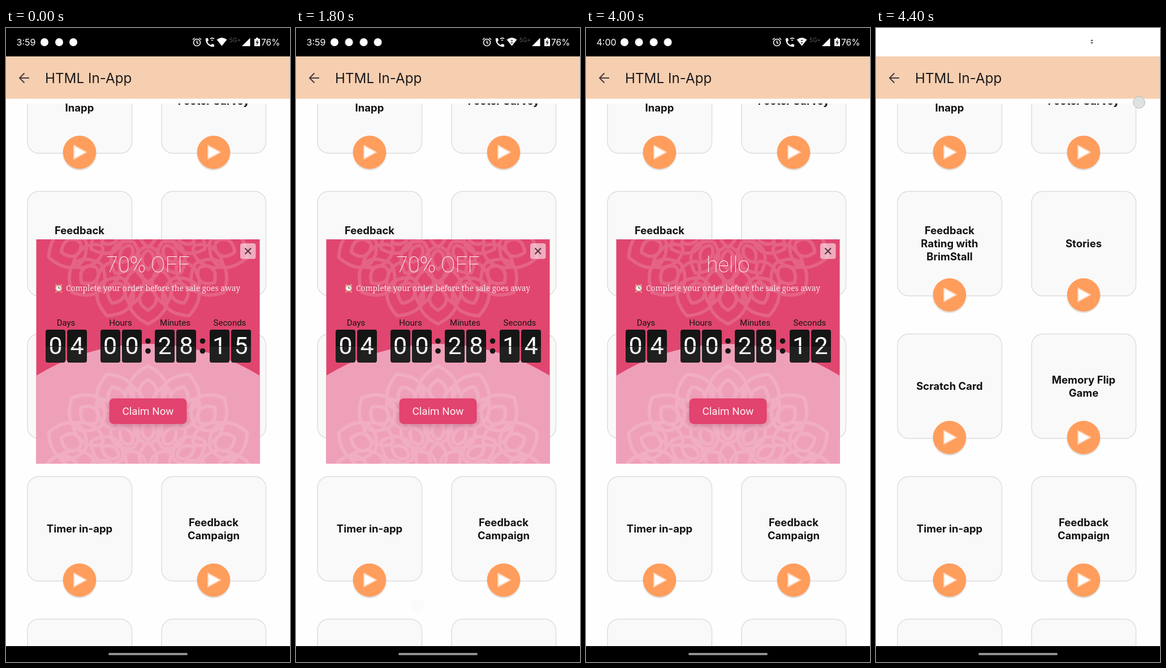
These frames come from a looping animation (502x1116 px, 4.5 s). An HTML page:

```html
<!DOCTYPE html>
<html lang="en">
<head>
<meta charset="utf-8">
<title>HTML In-App countdown</title>
<style>
  html, body { margin: 0; width: 100%; height: 100%; overflow: hidden; background: #fff; }
  #stage { position: relative; width: 502px; height: 1116px; overflow: hidden; background: #fefefe; }
  svg, #popup { position: absolute; left: 0; top: 0; width: 502px; height: 1116px; }
  svg text { font-family: Inter, sans-serif; }
  .mid { text-anchor: middle; }
  .label { font-size: 18.5px; font-weight: 700; fill: #111; text-anchor: middle; }
  svg .thin { font: 100 38px Roboto, sans-serif; fill: #fff; text-anchor: middle; }
  svg .unit { font: 15px Roboto, sans-serif; fill: #151515; text-anchor: middle; }

  .tile { position: absolute; top: 531px; width: 35px; height: 58px; perspective: 244px;
          font: 43px/57px Roboto, sans-serif; text-align: center; }
  .half { position: absolute; left: 0; width: 35px; height: 29px; overflow: hidden;
          box-sizing: border-box; backface-visibility: hidden; }
  .upper { top: 0; background: #151515; color: #fff; border-radius: 4px 4px 0 0; }
  .lower { top: 29px; background: #202020; color: #efefef; border-top: 1px solid #151515;
           border-radius: 0 0 4px 4px; }
  .lower span { position: relative; top: -30px; }
  .half span { display: block; }
  .leaf { position: absolute; inset: 0; transform-style: preserve-3d;
          animation: flip 1s 1290ms 3 both; }
  .leaf .lower { transform-origin: 50% 0; transform: rotateX(180deg); }

  .loop { animation: 4500ms linear infinite; }
  .fade { animation-name: fade; }
  .offer { animation-name: offer; }
  .hello { animation-name: hello; }
  .early { animation-name: early; }
  .late { animation-name: late; }
  .arrows { animation-name: arrows; }
  .shift { animation-name: shift; }
  .arrive { animation-name: arrive; }
  .pointer { animation-name: pointer; }
  .offer, .hello, .early, .late, .arrows, .pointer { animation-timing-function: step-end; }

  @keyframes flip {
    0% { transform: rotateX(0); animation-timing-function: ease-in-out; }
    50%, 100% { transform: rotateX(-180deg); }
  }
  @keyframes fade { 0%, 88.889% { opacity: 1; } 97.777%, 100% { opacity: 0; } }
  @keyframes offer { 0% { opacity: 1; } 86.66%, 100% { opacity: 0; } }
  @keyframes hello { 0% { opacity: 0; } 86.66%, 100% { opacity: 1; } }
  @keyframes early { 0% { opacity: 1; } 48.88%, 100% { opacity: 0; } }
  @keyframes late { 0% { opacity: 0; } 48.88%, 100% { opacity: 1; } }
  @keyframes arrows { 0% { opacity: 0; } 28.88%, 100% { opacity: 1; } }
  @keyframes shift {
    0%, 1% { transform: none; animation-timing-function: ease-out; }
    12%, 100% { transform: translateX(25.6px); }
  }
  @keyframes arrive { 0%, 4% { opacity: 0; } 12%, 100% { opacity: 1; } }
  @keyframes pointer {
    0% { opacity: 0; transform: translate(215px, 1016px); }
    37.77% { opacity: .1; transform: translate(215px, 1016px); }
    48.88% { opacity: 0; transform: translate(442px, 398px); }
    84.44% { opacity: .8; transform: translate(442px, 398px); }
    88.88% { opacity: 0; transform: translate(465px, 131px); }
    97.77%, 100% { opacity: 1; transform: translate(465px, 131px); }
  }
</style>
</head>
<body>
<div id="stage">
  <svg viewBox="0 0 502 1116">
    <defs>
      <clipPath id="list"><rect y="133" width="502" height="955"/></clipPath>
      <filter id="soft" x="-30%" y="-30%" width="160%" height="170%">
        <feDropShadow dx="0" dy="2" stdDeviation="1.2" flood-opacity=".18"/>
      </filter>
      <g id="play">
        <circle r="29.3" fill="#ff9d5c" filter="url(#soft)"/>
        <path d="M-10-12 12 0-10 12Z" fill="#fff" stroke="#ffd2b4" stroke-width="2" stroke-linejoin="round"/>
      </g>
    </defs>
    <g id="cards" clip-path="url(#list)"></g>
    <rect y="50" width="502" height="74.5" fill="#f6cfb0"/>
    <path d="M41 88H25M32.5 79.5 24 88l8.5 8.5" fill="none" stroke="#453b42" stroke-width="2"/>
    <text x="69" y="97" font-size="24.2" fill="#1d1a1d">HTML In-App</text>
    <rect y="1088" width="502" height="28" fill="#000"/>
    <rect x="181" y="1100" width="140" height="4" rx="2" fill="#929292"/>
  </svg>

  <div id="popup" class="loop fade">
    <svg viewBox="0 0 502 1116">
      <defs>
        <clipPath id="panel"><rect x="53.5" y="372" width="395" height="395"/></clipPath>
        <clipPath id="dome"><circle cx="251" cy="932" r="376"/></clipPath>
        <g id="mandala" fill="none" stroke="#fff" stroke-width="6" stroke-linejoin="round"></g>
      </defs>
      <g clip-path="url(#panel)">
        <rect x="53" y="372" width="396" height="395" fill="#e0466f"/>
        <use href="#mandala" transform="translate(251 331)" opacity=".16"/>
        <g clip-path="url(#dome)">
          <rect x="53" y="550" width="396" height="217" fill="#efa0b9"/>
          <use href="#mandala" transform="translate(251 785)" opacity=".15"/>
        </g>
      </g>
      <rect x="414" y="379" width="27.5" height="27.5" rx="4" fill="#fff" opacity=".55"/>
      <path d="m422.5 387.5 10.5 10.5m0-10.5-10.5 10.5" stroke="#593a45" stroke-width="2.3"/>
      <text class="thin loop offer" x="251" y="430">70% OFF</text>
      <text class="thin loop hello" x="251" y="430">hello</text>
      <g fill="none" stroke-linecap="round">
        <path d="M88 453l1-1m8 0 1 1M89 464l-1 1m9-1 1 1" stroke="#e8a48e" stroke-width="2"/>
        <circle cx="93" cy="458" r="5.3" fill="#f5f1ec" stroke="#dca090" stroke-width="1.5"/>
        <path d="M93 455v3h2.5" stroke="#444"/>
      </g>
      <text x="106" y="462.5" fill="#fbe6ed"
            style="font:13.8px 'Noto Serif',serif">Complete your order before the sale goes away</text>
      <text class="unit" x="106" y="524">Days</text>
      <text class="unit" x="202.5" y="524">Hours</text>
      <text class="unit" x="299" y="524">Minutes</text>
      <text class="unit" x="395.5" y="524">Seconds</text>
      <g fill="#151515">
        <circle cx="251" cy="551" r="4.8"/><circle cx="251" cy="568.5" r="4.8"/>
        <circle cx="347.5" cy="551" r="4.8"/><circle cx="347.5" cy="568.5" r="4.8"/>
      </g>
      <rect x="182.5" y="652" width="137" height="45" rx="8" fill="#e2436f"
            style="filter:drop-shadow(0 4px 5px rgba(80,20,45,.2))"/>
      <text x="251" y="681" class="mid" fill="#fdeff3" style="font:18.8px Roboto,sans-serif">Claim Now</text>
    </svg>
  </div>

  <svg viewBox="0 0 502 1116">
    <rect width="502" height="50" fill="#fff"/>
    <rect class="loop fade" width="502" height="50" fill="#000"/>
    <g fill="#fff">
      <text class="loop early" x="18.5" y="31" font-size="16">3:59</text>
      <text class="loop late" x="18.5" y="31" font-size="16">4:00</text>
      <circle class="loop arrive" cx="68" cy="25" r="7"/>
      <g class="loop shift">
        <circle cx="68" cy="25" r="7"/><circle cx="94" cy="25" r="7"/><circle cx="119" cy="25" r="7"/>
      </g>
      <g fill="none" stroke="#fff" stroke-width="1.6">
        <circle cx="337.5" cy="25.5" r="6"/>
        <path d="M337.5 22v4l2.5 1.5M330 20.5l3.5-3m8 0 3.5 3"/>
        <path d="M361 19c3-2 5-2 7 0m-5 3c1-1 2-1 3 0"/>
      </g>
      <path d="M353 18h4l1 4-2 2c1 3 3 5 6 6l2-2 4 1v4c-9 1-16-6-15-15Z"/>
      <path d="M372.5 20.5q9-7 18 0l-9 11Z"/>
      <path class="loop arrows" d="M379 23h5l-2.500-3Zm0 2h5l-2.500 3Z" fill="#555"/>
      <text class="loop fade" x="395" y="25" font-size="10" fill="#5c5c5c">5G+</text>
      <path d="M417 32h14.5V17.5Z"/>
      <path d="M442 17h4v2h3v13h-10V19h3Z"/>
      <path class="loop fade" d="m445 20-4 6h2.500l-.5 5 4-6.500h-2.500Z" fill="#333"/>
      <text x="451" y="31" font-size="15.5">76%</text>
    </g>
    <circle class="loop pointer" r="10.3" fill="#dfe2e3" stroke="#b4b8ba"/>
  </svg>
</div>

<script>
const LOOP = 4500, STEP = 100, FIRST_FLIP = 1290, START_VALUE = 15;
const $ = id => document.getElementById(id);

const rows = [
  ["|Inapp", "Footer Survey"],
  ["Feedback|Rating with|BrimStall", "Stories"],
  ["Scratch Card", "Memory Flip|Game"],
  ["Timer in-app", "Feedback|Campaign"],
  ["", ""]
];
$("cards").innerHTML = rows.map((row, r) => row.map((label, c) => {
  const x = 130 + 237 * c, y = 128.5 + 251 * r;
  const lines = label.split("|");
  const text = lines.map((line, i) =>
    `<text class="label" x="${x}" y="${y + 6.5 + 23 * (i - (lines.length - 1) / 2)}">${line}</text>`).join("");
  return `<rect x="${x - 92}" y="${y - 92}" width="184.5" height="184" rx="20"
    fill="#f9f9f9" stroke="#dcdcdc" stroke-width="1.4"/>${text}
    <use href="#play" x="${x}" y="${y + 90.2}"/>`;
}).join("")).join("");

// Rings of pointed petals: count, inner radius, outer radius, half width, turn in petals.
const petalRing = (count, inner, outer, width, turn) => {
  const at = k => -(inner + (outer - inner) * k);
  const d = `M0 ${-inner}C${-width} ${at(.2)} ${-width} ${at(.7)} 0 ${-outer}` +
            `C${width} ${at(.7)} ${width} ${at(.2)} 0 ${-inner}`;
  return Array.from({ length: count }, (_, i) =>
    `<path d="${d}" transform="rotate(${(i + turn) * 360 / count})"/>`).join("");
};
$("mandala").innerHTML =
  petalRing(16, 118, 190, 44, 0) + petalRing(16, 128, 166, 20, 0) +
  petalRing(16, 96, 160, 22, .5) + petalRing(12, 52, 116, 32, 0) +
  petalRing(12, 60, 94, 14, 0) + petalRing(8, 8, 55, 20, 0);

const half = (side, digit) => `<div class="half ${side}"><span>${digit}</span></div>`;
const tileLeft = [70, 108, 166.5, 205, 263, 301, 359.5, 398];
[..."04002815"].forEach((digit, i, all) => {
  const tile = document.createElement("div");
  tile.className = "tile";
  tile.style.left = tileLeft[i] + "px";
  const halves = half("upper", digit) + half("lower", digit);
  tile.innerHTML = halves + (i === all.length - 1 ? `<div class="leaf">${halves}</div>` : "");
  $("popup").append(tile);
});
const [nextTop, lastBottom, lastTop, nextBottom] =
  document.querySelectorAll(".tile:last-child span");

const animations = document.getAnimations();
animations.forEach(a => a.pause());
const start = performance.now();

// The picture moves in steps of a tenth of a second.
function draw() {
  const time = Math.floor((performance.now() - start) % LOOP / STEP) * STEP;
  const flips = Math.min(3, Math.max(0, Math.floor((time - FIRST_FLIP) / 1000) + 1));
  const next = START_VALUE - flips, last = Math.min(START_VALUE, next + 1);
  nextTop.textContent = nextBottom.textContent = next % 10;
  lastTop.textContent = lastBottom.textContent = last % 10;
  animations.forEach(a => { a.currentTime = time; });
  requestAnimationFrame(draw);
}
draw();
</script>
</body>
</html>
```
